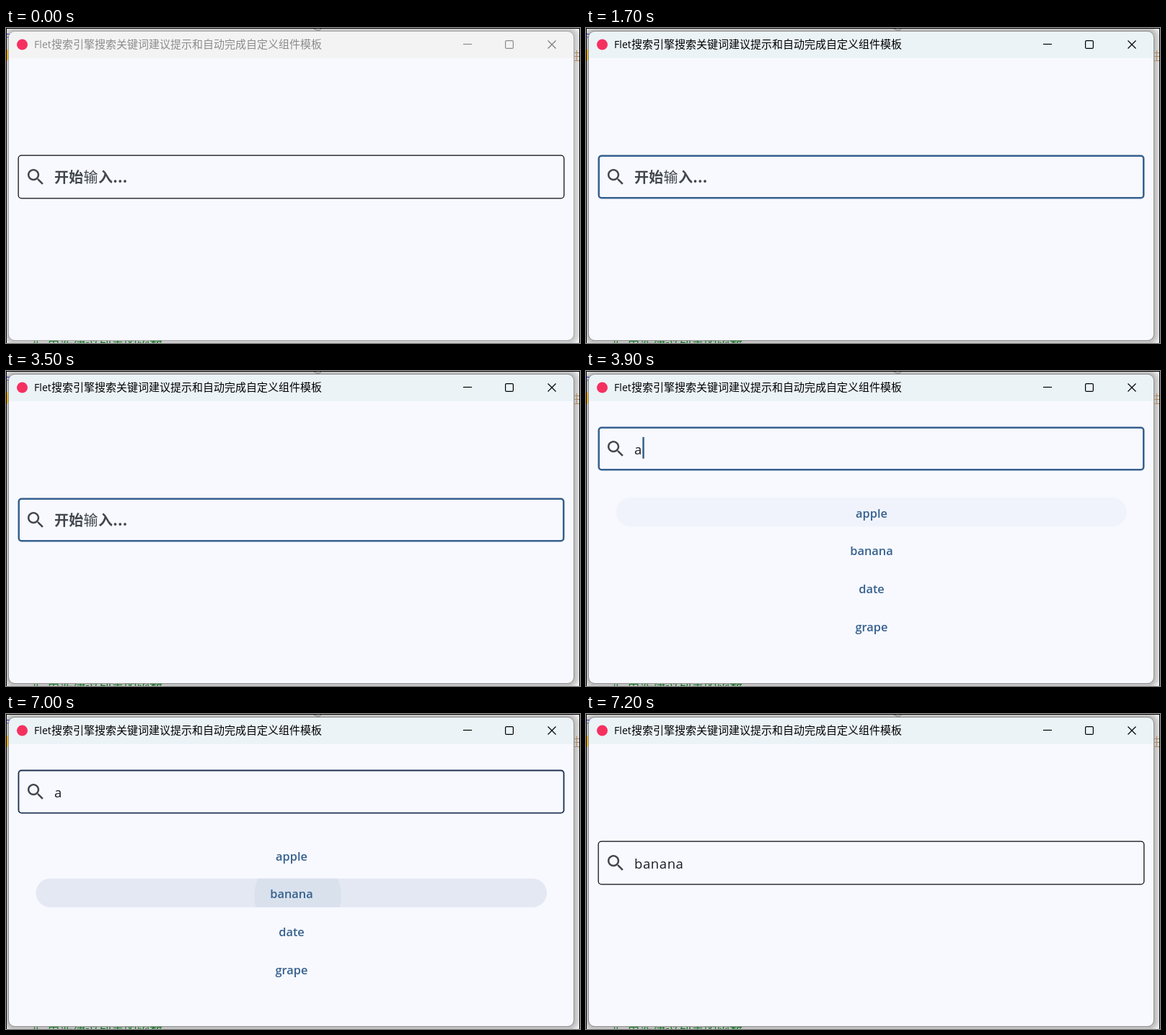
An HTML page for the animation above (8000 ms loop, 796x438 px).

```html
<!DOCTYPE html>
<html lang="zh">
<head>
<meta charset="utf-8">
<style>
  html, body { margin: 0; width: 100%; height: 100%; overflow: hidden; background: #e6e6e6; }
  svg { display: block; width: 796px; height: 438px; }
  .cjk { font-family: "Noto Sans CJK SC", "Noto Sans CJK", sans-serif; }
  .latin { font-family: "Open Sans", "Noto Sans", sans-serif; }
  .label { font-size: 16.4px; font-weight: 600; fill: #36618e; text-anchor: middle; }
  .value { font-size: 18.5px; letter-spacing: .6px; fill: #191c20; }
  .hint { font-size: 20px; letter-spacing: .3px; fill: #42474e; }
</style>
</head>
<body>
<svg viewBox="0 0 796 438">
  <defs>
    <clipPath id="pillClip"><rect x="41.5" y="228.8" width="708.5" height="40" rx="20"/></clipPath>
    <clipPath id="winClip"><rect x="4" y="5" width="783" height="429" rx="8"/></clipPath>
  </defs>

  <!-- editor behind the window -->
  <rect width="796" height="438" fill="#ececec"/>
  <g id="shadow" fill="none" stroke="#000"></g>
  <path d="M1 8.5h4M2 12l2 3" stroke="#2a2ae0" fill="none"/>
  <rect x="1" y="30" width="4" height="15" fill="#f0b000"/>
  <path d="M427 1l4 2h4l2-2" stroke="#777" fill="none"/>
  <path d="M787 34.5h8M787 39.5h8M787 45.5h8M791.5 31v14" stroke="#b08a60" fill="none"/>
  <text class="cjk" font-size="17.8" fill="#1c7c2c" y="447"><tspan x="36">#</tspan><tspan x="57">更新建议列表的函数</tspan></text>
  <path d="M0 .5H796M.5 0V438M795.5 0V438" stroke="#000" fill="none"/>

  <!-- window -->
  <g clip-path="url(#winClip)">
    <rect x="4" y="5" width="783" height="429" fill="#f8f9ff"/>
    <rect id="bar" x="4" y="5" width="783" height="37"/>
  </g>
  <rect id="frame" x="3.5" y="4.5" width="784" height="430" rx="8.5" fill="none"/>
  <circle cx="22.5" cy="23" r="7.5" fill="#f5305f"/>
  <g id="title">
    <text class="latin" x="39" y="28" font-size="14.2">Flet</text>
    <text class="cjk" x="63" y="28" font-size="15">搜索引擎搜索关键词建议提示和自动完成自定义组件模板</text>
  </g>
  <g id="buttons" fill="none" stroke-width="1.2">
    <path d="M634 22.5h12"/>
    <rect x="692.6" y="17.6" width="10.8" height="10.8" rx="1.5"/>
    <path id="close" d="M751.5 17.5l11 11M762.5 17.5l-11 11"/>
  </g>

  <!-- suggestions -->
  <g id="list">
    <rect id="pill0" x="41.5" y="176.2" width="708.5" height="40" rx="20" fill="#36618e"/>
    <rect id="pill1" x="41.5" y="228.8" width="708.5" height="40" rx="20" fill="#36618e"/>
    <circle id="ripple" cx="404.5" cy="253" fill="#8fb0bd" clip-path="url(#pillClip)"/>
  </g>

  <!-- search field -->
  <g id="field">
    <rect id="border" fill="none"/>
    <path transform="translate(26.2 192.2) scale(1.25)" fill="#42474e" d="M15.5 14h-.79l-.28-.27C15.41 12.59 16 11.11 16 9.5 16 5.91 13.09 3 9.5 3S3 5.91 3 9.5 5.91 16 9.5 16c1.61 0 3.09-.59 4.23-1.57l.27.28v.79l5 4.99L20.49 19l-4.99-5zm-6 0C7.01 14 5 11.99 5 9.5S7.01 5 9.5 5 14 7.01 14 9.5 11.99 14 9.5 14z"/>
    <text id="hint" class="cjk hint" x="67" y="215"><tspan font-weight="700">开始</tspan><tspan font-weight="300">输</tspan><tspan font-weight="700">入...</tspan></text>
    <text id="value" class="latin value" x="67" y="215"></text>
    <rect id="caret" y="190.8" width="2.5" height="30" fill="#36618e"/>
  </g>
</svg>
<script>
const LOOP = 8000, FOCUS = 1200, TYPE = 3900, MOVE = 6100, PRESS = 7000, PICK = 7200;
const BLINKS = [1200, 1700, 2100, 2600, 3100, 3500, 3900, 4400, 4800, 5300, 5700, 6200, 6700, 7000];
const NS = "http://www.w3.org/2000/svg";
const $ = id => document.getElementById(id);
const set = (id, attrs) => { for (const k in attrs) $(id).setAttribute(k, attrs[k]); };
const show = (id, on) => set(id, { visibility: on ? "visible" : "hidden" });
const clamp = v => Math.max(0, Math.min(1, v));
const mix = (a, b, k) => `rgb(${a.map((v, i) => Math.round(v + (b[i] - v) * k))})`;

function add(parent, name, attrs, text = "") {
  const el = document.createElementNS(NS, name);
  for (const k in attrs) el.setAttribute(k, attrs[k]);
  el.textContent = text;
  $(parent).append(el);
}

["apple", "banana", "date", "grape"].forEach((word, i) =>
  add("list", "text", { class: "latin label", x: 396, y: 203.8 + i * 52.6 }, word));

for (let i = 0; i < 8; i++)
  add("shadow", "rect", {
    x: 3.5 - i, y: 4.5 - i, width: 784 + 2 * i, height: 430 + 2 * i, rx: 8.5 + i,
    "stroke-width": 1.5, "stroke-opacity": 0.16 - i * 0.017
  });

// 0 = idle outline, 1 = focused outline
function drawBorder(k) {
  const w = 1.25 + 1.25 * k;
  const dark = [8, 10, 14], mid = [30, 52, 84], blue = [54, 97, 142];
  set("border", {
    x: 16.5 + w / 2, y: 176.5 + w / 2, width: 758 - w, height: 61 - w, rx: 5 - w / 2,
    "stroke-width": w,
    stroke: k < 0.5 ? mix(dark, mid, k * 2) : mix(mid, blue, k * 2 - 1)
  });
}

function focusAt(t) {
  if (t < FOCUS || t >= PRESS + 100) return 0;
  if (t >= PRESS) return 0.5;
  return t < FOCUS + 100 ? 0.5 : 1;
}

function draw(now) {
  const t = Math.floor((now % LOOP) / 100) * 100;
  const active = t >= FOCUS, open = t >= TYPE && t < PICK;

  const ink = active ? "#000" : "#8c8c8c";
  const fade = active ? clamp((t - FOCUS + 150) / 450) : 0;
  set("bar", { fill: mix([243, 243, 243], [235, 243, 247], fade) });
  set("title", { fill: ink });
  set("buttons", { stroke: ink });
  set("close", { stroke: active ? "#000" : mix([125, 125, 125], [145, 145, 145], clamp(t / 300)) });
  set("shadow", { opacity: active ? 1 : 0.8 });
  set("frame", { stroke: active ? "#929292" : "#a8a8a8" });

  set("field", { transform: `translate(0 ${open ? -99 : 0})` });
  drawBorder(focusAt(t));
  show("hint", t < TYPE);
  $("value").textContent = t >= PICK ? "banana" : open ? "a" : "";
  set("caret", { x: open ? 78.3 : 67.3 });
  show("caret", t < PRESS && BLINKS.filter(b => b <= t).length % 2);

  show("list", open);
  const enter = clamp((t - TYPE + 100) / 200), swap = clamp((t - MOVE + 100) / 200);
  const press = clamp((t - PRESS + 100) / 200);
  set("pill0", { opacity: 0.08 * enter * (1 - swap) });
  set("pill1", { opacity: 0.08 * swap + 0.06 * press });
  set("ripple", { r: press < 1 ? 120 * press : 138.5, opacity: 0.25 * press });
}

function tick() {
  draw(performance.now());
  requestAnimationFrame(tick);
}
tick();
</script>
</body>
</html>
```
